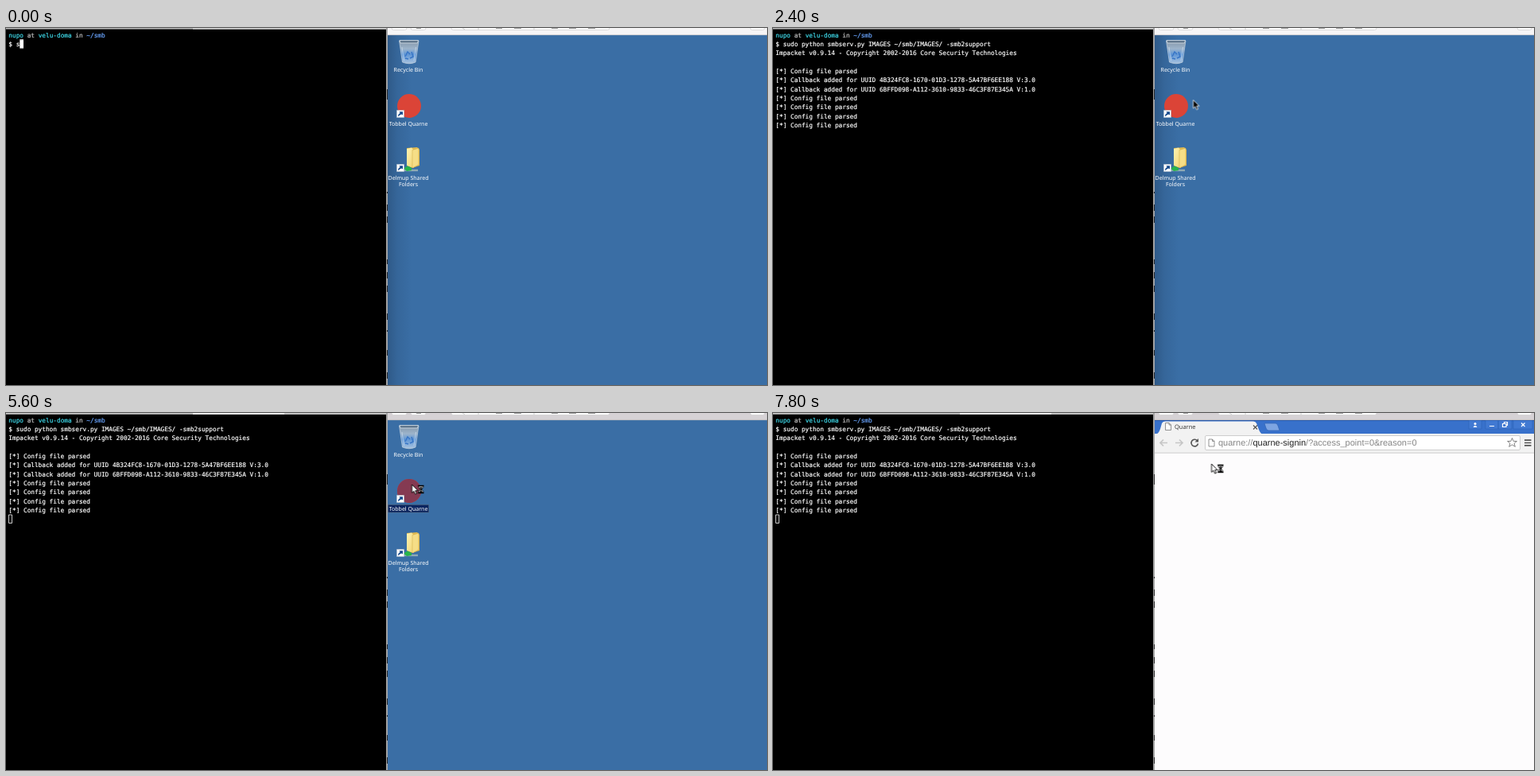
Animation, 957 px wide and 449 px high, one loop 8000 ms. Source, as an HTML page:

```html
<!DOCTYPE html>
<html lang="en">
<head>
<meta charset="utf-8">
<title>Terminal and desktop</title>
<style>
  html, body { margin: 0; width: 100%; height: 100%; overflow: hidden; background: #000; }
  svg { display: block; width: 100%; height: 100%; text-rendering: geometricPrecision; }

  .term { font: 7.75px "DejaVu Sans Mono", monospace; fill: #fff; stroke: #fff; stroke-width: .2; }
  .user { fill: #3fdcec; stroke: #3fdcec; }
  .path { fill: #6aa5ff; stroke: #6aa5ff; }
  .dim { fill: #c4c4c4; stroke: #c4c4c4; }
  .label { font: 7px "Noto Sans", sans-serif; fill: #fff; text-anchor: middle; }
  .tab { font: 7.5px "Open Sans", sans-serif; fill: #333; }
  .url { font: 11px "Liberation Sans", Arial, sans-serif; fill: #858585; }
  .url tspan { fill: #222; }

  .write, .blink, .mouse, .idle, .active, .busy, .window, .loaded { animation: 8s step-end infinite; }
  .write { animation-name: write; }
  .blink { animation-name: blink; }
  .mouse { animation-name: mouse; }
  .idle { animation-name: idle; }
  .active { animation-name: active; }
  .busy { animation-name: busy; }
  .window { animation-name: window; }
  .loaded { animation-name: loaded; }

  /* The caret carries a black cover that uncovers the text behind it. */
  @keyframes write {
    0% { transform: translate(14px, 11.34px); }
    2.5% { transform: translate(18.67px, 11.34px); }
    5% { transform: translate(23.33px, 11.34px); }
    7.5% { transform: translate(28px, 11.34px); }
    10% { transform: translate(270.7px, 11.34px); }
    15% { transform: translate(0, 22.68px); }
    20% { transform: translate(0, 45.36px); }
    22.5%, 100% { transform: translate(0, 124.74px); }
  }
  @keyframes blink {
    0% { visibility: visible; }
    30% { visibility: hidden; }
    32.5% { visibility: visible; }
    37.5%, 100% { visibility: hidden; }
  }
  @keyframes mouse {
    0% { transform: translate(-50px, 0); }
    27.5% { transform: translate(567px, 97px); }
    30% { transform: translate(528.5px, 90.5px); }
    32.5% { transform: translate(512px, 90.5px); }
    35% { transform: translate(510.5px, 90px); }
    95%, 100% { transform: translate(551.5px, 64px); }
  }
  @keyframes idle { 0% { visibility: visible; } 37.5%, 100% { visibility: hidden; } }
  @keyframes active { 0% { visibility: hidden; } 37.5%, 100% { visibility: visible; } }
  @keyframes busy { 0% { visibility: hidden; } 47.5%, 100% { visibility: visible; } }
  @keyframes window { 0% { visibility: hidden; } 90%, 100% { visibility: visible; } }
  @keyframes loaded { 0% { visibility: hidden; } 92.5%, 100% { visibility: visible; } }
</style>
</head>
<body>
<svg viewBox="0 0 957 449" preserveAspectRatio="none">
  <defs>
    <clipPath id="terminal"><path d="M0 2H478V449H0Z"/></clipPath>
    <linearGradient id="shade">
      <stop offset="0" stop-color="#12253d" stop-opacity=".28"/>
      <stop offset=".4" stop-color="#12253d" stop-opacity=".11"/>
      <stop offset="1" stop-color="#12253d" stop-opacity="0"/>
    </linearGradient>
    <linearGradient id="glass" x2="0" y2="1">
      <stop offset="0" stop-color="#8295a8"/>
      <stop offset=".35" stop-color="#9db4cb"/>
      <stop offset=".6" stop-color="#5f96d6"/>
      <stop offset="1" stop-color="#a9c3de"/>
    </linearGradient>
    <linearGradient id="paper" x2="1" y2="1">
      <stop offset="0" stop-color="#fff3b4"/>
      <stop offset="1" stop-color="#f0d36f"/>
    </linearGradient>
    <g id="shortcut">
      <path d="M.5 .5H9.5V9.5H.5Z" fill="#fff" stroke="#b9c4d0" stroke-width=".6"/>
      <path d="M2 8.3C2 6 3 4.7 4.6 4L3.5 2.2H8V6.6L6.5 5.4C5 6 3.7 6.8 2 8.3Z" fill="#174a8c"/>
    </g>
    <path id="page" d="M.5 .5H5L7.5 3V9.5H.5ZM5 .5V3H7.5" fill="#fff" stroke="#777" stroke-width=".8"/>
    <path id="arrow" d="M0 0V10.500L2.400 8.300L4.200 12.200L6 11.400L4.300 7.700H7.500Z"/>
  </defs>

  <!-- Desktop -->
  <path d="M480 9H957V449H480Z" fill="#3a6ea5"/>
  <path class="idle" d="M480 9H510V449H480Z" fill="url(#shade)"/>

  <path d="M494.500 16L498.500 43Q507 46.500 515 43L519 16Z" fill="url(#glass)" stroke="#c3d2e0" stroke-width=".7"/>
  <path d="M495 15.500H518.500L517.500 19H496Z" fill="#62788e" stroke="#d5e0ea" stroke-width=".8"/>
  <path d="M498 24L500.500 41M515.500 24L513 41" stroke="#e6eff7" opacity=".5"/>
  <path d="M502 36L505 30L508 33M510 30L512 36L508 38M506 39L502 38" fill="none" stroke="#3775c6" stroke-width="1.500"/>
  <text class="label" x="506" y="54.700">Recycle Bin</text>

  <circle cx="507" cy="98" r="15" fill="#db4437"/>
  <circle class="active" cx="507" cy="98" r="15" fill="#853a52"/>
  <use href="#shortcut" x="491" y="103"/>
  <path class="active" d="M480.500 115.500H531.500V125H480.500Z" fill="#0a2560" stroke="#6f6a66" stroke-width=".7" stroke-dasharray="1 1"/>
  <text class="label" x="506" y="122.700">Tobbel Quarne</text>

  <path d="M504 151L517 150L520 153V173L511 176L504 173Z" fill="#e3bb4e"/>
  <path d="M504 152L510 150.500L513 154V176L504 173Z" fill="url(#paper)"/>
  <path d="M511 153.500L519 151V172L511 176Z" fill="#f6de86" stroke="#cfa844" stroke-width=".5"/>
  <path d="M500 179H518" stroke="#8ea9b5" stroke-width="2.400"/>
  <path d="M500 176.500L505 173.500L510 176V179L504 180Z" fill="#27b34b"/>
  <use href="#shortcut" x="491" y="171"/>
  <text class="label" x="506" y="190.700">Delmup Shared<tspan x="506" dy="8.500">Folders</tspan></text>

  <!-- Edge of the toolbar above the desktop -->
  <path d="M480 0H957V9H480Z" fill="#f6f5f6"/>
  <path class="active" d="M480 0H957V9H480Z" fill="#d6d2d5"/>
  <g fill="#fff" stroke="#cfcdcf" stroke-width=".7">
    <rect x="485" y="-12" width="19" height="14.500" rx="2.500"/>
    <rect x="509" y="-12" width="19" height="14.500" rx="2.500"/>
    <rect x="560" y="-12" width="199" height="14.500" rx="2.500"/>
    <rect x="936" y="-12" width="18" height="14.500" rx="2.500"/>
  </g>
  <path d="M616 .5h8M639 .5h9M686 .5h8M708 .5h9M732 .5h9M516 .5h6" stroke="#999"/>
  <path d="M574 0l3 2M594 0v2M664 0v2" stroke="#ccc"/>
  <path d="M480 8.700H957" stroke="#b5b3b5" stroke-width=".6"/>

  <!-- Browser -->
  <g class="window">
    <path d="M480 9H957V449H480Z" fill="#fdfcfd"/>
    <path d="M480 9H957V27H480Z" fill="#3871cb"/>
    <path d="M480 9.500H957" stroke="#2b5aa9"/>
    <path d="M480 26H957V50H480Z" fill="#f2f2f2"/>
    <path d="M481 27Q485 26 487 20L489 13Q490 10.500 493 10.500H604Q607 10.500 608 13L611 21Q613 26 616 27Z" fill="#f2f2f2"/>
    <path d="M618 13H632Q634 13 635 16L637 22H623Q621 22 620 19Z" fill="#7ea5e2" stroke="#2d5fae" stroke-width=".6"/>
    <path d="M480 50.200H957" stroke="#c4c4c4" stroke-width=".8"/>
  </g>
  <g class="loaded">
    <use href="#page" x="493" y="12"/>
    <text class="tab" x="505" y="20">Quarne</text>
    <path d="M604 15.500l5 5m0-5l-5 5" stroke="#555" stroke-width="1.200"/>
    <path d="M875 9.500H891V20H875ZM896 9.500H912V20H896ZM912 9.500H929V20H912ZM931 9.500H955V20H931Z" fill="#4179d2" stroke="#2e62b5" stroke-width=".6"/>
    <circle cx="883" cy="13.500" r="1.500" fill="#fff"/>
    <path d="M880.500 18Q883 13.500 885.500 18Z" fill="#fff"/>
    <path d="M901 16.500h6M917.500 13.500h4.500v4h-4.500zM919.500 13v-1.500h4v4h-1.500M941 12.500l4.500 4.500m0-4.500l-4.500 4.500" fill="none" stroke="#fff" stroke-width="1.200"/>
    <path d="M496 37.500H487M491 33.500l-4 4l4 4M506 37.500h9M511 33.500l4 4l-4 4" fill="none" stroke="#c6c6c6" stroke-width="1.700"/>
    <path d="M533.500 34.700A4.300 4.300 0 1 0 534.500 38.500" fill="none" stroke="#555" stroke-width="1.600"/>
    <path d="M535 32V36.500H530.500Z" fill="#555"/>
    <rect x="543.500" y="28.500" width="396" height="18" rx="1.500" fill="#fff" stroke="#c3c3c3" stroke-width=".8"/>
    <use href="#page" x="547.500" y="32.500"/>
    <text class="url" x="560" y="41">quarne://<tspan>quarne-signin</tspan>/?access_point=0&amp;reason=0</text>
    <path d="M929.500 31.500l1.700 4h4.200l-3.300 2.700l1.200 4.200l-3.800-2.500l-3.800 2.500l1.200-4.200l-3.300-2.700h4.200z" fill="none" stroke="#777" stroke-width=".9"/>
    <path d="M945 34.200h8.500m-8.500 3.300h8.500m-8.500 3.300h8.500" stroke="#555" stroke-width="1.700"/>
  </g>

  <!-- Terminal -->
  <path d="M0 0H478V449H0Z"/>
  <path d="M0 0H478V1.600H0Z" fill="#b9b9b9"/>
  <path d="M235 0H478V1.600H235Z" fill="#d4d4d4"/>
  <g class="active">
    <path d="M0 0H478V1.600H0Z" fill="#c9c9c9"/>
    <path d="M235 0H350V1.600H235Z" fill="#f4f4f4"/>
  </g>
  <path d="M478 0H480V449H478Z" fill="#a3a3a3"/>
  <path d="M479.500 77v13M479.500 206v2M479.500 222v8M479.500 237v8M479.500 291v6M479.500 307v8M479.500 324v8M479.500 359v8M479.500 380v2M479.500 405v7M479.500 433v8" stroke="#222"/>

  <g clip-path="url(#terminal)">
    <text class="term" y="11.5">
      <tspan x="3.3"><tspan class="user">nupo</tspan> <tspan class="dim">at</tspan> <tspan class="user">velu-doma</tspan> <tspan class="dim">in</tspan> <tspan class="path">~/smb</tspan></tspan>
      <tspan x="3.3" dy="11.34">$ sudo python smbserv.py IMAGES ~/smb/IMAGES/ -smb2support</tspan>
      <tspan x="3.3" dy="11.34">Impacket v0.9.14 - Copyright 2002-2016 Core Security Technologies</tspan>
      <tspan x="3.3" dy="22.68">[*] Config file parsed</tspan>
      <tspan x="3.3" dy="11.34">[*] Callback added for UUID 4B324FC8-1670-01D3-1278-5A47BF6EE188 V:3.0</tspan>
      <tspan x="3.3" dy="11.34">[*] Callback added for UUID 6BFFD098-A112-3610-9833-46C3F87E345A V:1.0</tspan>
      <tspan x="3.3" dy="11.34">[*] Config file parsed</tspan>
      <tspan x="3.3" dy="11.34">[*] Config file parsed</tspan>
      <tspan x="3.3" dy="11.34">[*] Config file parsed</tspan>
      <tspan x="3.3" dy="11.34">[*] Config file parsed</tspan>
    </text>
    <g class="write">
      <path d="M3.300 3.300H480V460H-300V14.640H3.300Z"/>
      <path class="blink" d="M3.300 3.300h4.700v11h-4.700z" fill="#fff"/>
    </g>
    <path class="active" d="M3.500 128h4v10.500h-4z" fill="none" stroke="#e4e4e4" stroke-width=".9"/>
  </g>

  <!-- Pointer -->
  <g class="mouse">
    <use class="idle" href="#arrow" fill="#000" stroke="#fff" stroke-width=".8"/>
    <use class="active" href="#arrow" fill="#fff" stroke="#000" stroke-width=".9"/>
    <g class="busy">
      <path d="M8.500 1.800H14V3.500L12 6L14 8.500V10.200H8.500V8.500L10.500 6L8.500 3.500Z" fill="#fff" stroke="#000" stroke-width=".9"/>
      <path d="M7.600 1.500H15M7.600 10.500H15M9.800 4h3M11.300 5v4M9.800 9h3" stroke="#000" stroke-width="1.300"/>
    </g>
  </g>
</svg>
</body>
</html>
```
